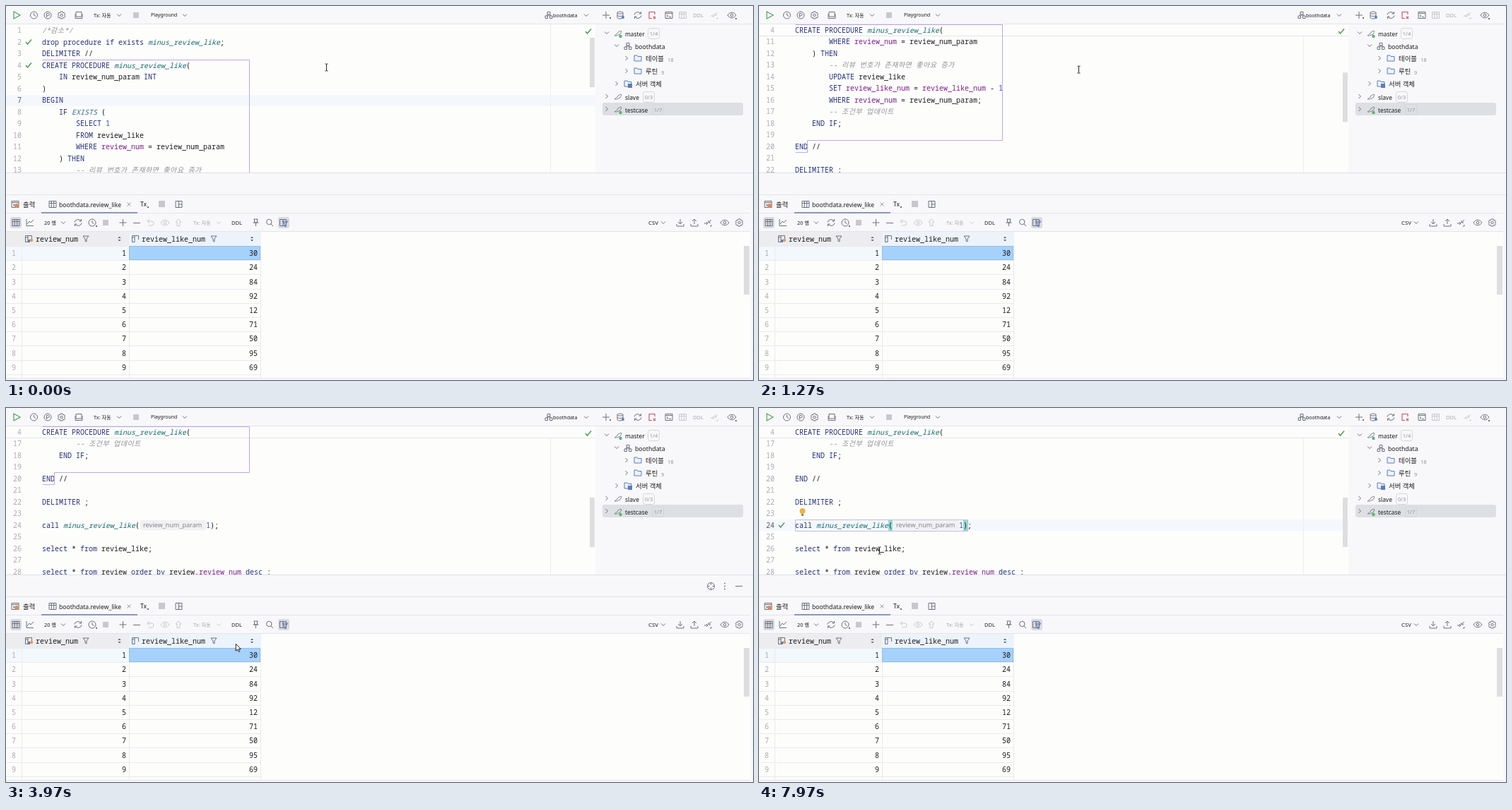
Recreate the animation shown at these times as an HTML page with a canvas. Size 1057 by 530 pixels, loop 8000 ms.

```html
<!DOCTYPE html>
<html lang="ko">
<head>
<meta charset="utf-8">
<style>
html, body { margin: 0; width: 100%; height: 100%; overflow: hidden; background: #fff; }
canvas { display: block; }
</style>
</head>
<body>
<canvas id="stage" width="1057" height="530"></canvas>
<script>
const g = document.getElementById('stage').getContext('2d');
const MONO = '"Noto Sans Mono", "Noto Sans CJK KR", monospace';
const UI = '"Noto Sans", "Noto Sans CJK KR", sans-serif';
const PAPER = '#fdfdfc', PANEL = '#f8f8fa', LINE = '#e4e5ea', INK = '#1c1c20', ICON = '#6c707e', FAINT = '#c6c8ce', MUTED = '#92949c', BLUE = '#5b7cc0', GREEN = '#4fa25c', FRAME = '#bfa6ee';
const LOOP = 8000, CHAR = 6, LEFT = 51, ROW = 16.5, CLICK = 4600, DONE = 7200;

const code = `/*감소*/
drop procedure if exists minus_review_like;
DELIMITER //
CREATE PROCEDURE minus_review_like(
    IN review_num_param INT
)
BEGIN
    IF EXISTS (
        SELECT 1
        FROM review_like
        WHERE review_num = review_num_param
    ) THEN
        -- 리뷰 번호가 존재하면 좋아요 증가
        UPDATE review_like
        SET review_like_num = review_like_num - 1
        WHERE review_num = review_num_param;
        -- 조건부 업데이트
    END IF;

END //

DELIMITER ;

call minus_review_like(1);

select * from review_like;

select * from review order by review.review_num desc ;`.split('\n');
const likes = [30, 24, 84, 92, 12, 71, 50, 95, 69];
const keyword = /^(drop|procedure|if|exists|delimiter|create|in|int|begin|select|from|where|then|update|set|end|call|order|by|desc)$/i;

// Icon outlines around their own centre
const circle = r => `M${r} 0A${r} ${r} 0 1 1 ${-r} 0A${r} ${r} 0 1 1 ${r} 0`;
const icons = {
  play: 'M-4-5L5 0L-4 5Z',
  clock: circle(5) + 'M0-3V0L2.5 1.5',
  letter: circle(5) + 'M-1.5 3V-2.5H.5A1.5 1.5 0 0 1 .5 .8H-1.5',
  gear: 'M-1.5-5H1.5L2-3.5L4-3.5L5-1L4 0L5 1.5L4 3.8L2 3.5L1.5 5H-1.5L-2 3.5L-4 3.8L-5 1.5L-4 0L-5-1L-4-3.5L-2-3.5Z' + circle(1.7),
  screen: 'M-4-4.5H4V2H-4ZM-5-2V4.5H5V-2',
  down: 'M-3-1.5L0 1.5L3-1.5',
  right: 'M-1.5-3L1.5 0L-1.5 3',
  schema: 'M-2-4.5H2V-1H-2ZM-5 1H-1.5V4.5H-5ZM1.5 1H5V4.5H1.5ZM0-1V0M-3 1V0H3V1',
  plus: 'M-5 0H5M0-5V5',
  minus: 'M-5 0H5',
  base: 'M-4-3.5C-4-5.5 4-5.5 4-3.5V3.5C4 5.5-4 5.5-4 3.5ZM-4-3.5C-4-1.5 4-1.5 4-3.5M-4 0C-4 2 4 2 4 0',
  refresh: 'M-5-.5A5 4.6 0 0 1 4-2.5M5 .5A5 4.6 0 0 1-4 2.5M4.5-5V-2H1.5M-4.5 5V2H-1.5',
  cut: 'M4-1V-4.5H-4V4.5H0M2 2L5 5M5 2L2 5',
  console: 'M-5-4.5H5V4.5H-5ZM-5-2.5H5M-3-.5L-1 1L-3 2.5M0 2.5H3',
  table: 'M-5-4.5H5V4.5H-5ZM-5-1.5H5M-1.7-4.5V4.5M1.7-4.5V4.5',
  arrows: 'M5-4L1 0M1-3V0H4M-5 1H0M-2-1L0 1L-2 3M3 5H5V3',
  eye: 'M-6 0C-3-5 3-5 6 0C3 5-3 5-6 0Z' + circle(1.8),
  link: 'M-5 3L-1 0L0-2L4-4L5-3L3 1L-2 3Z',
  folder: 'M-5-4H-1L0-2.5H5V4H-5Z',
  close: 'M-2.5-2.5L2.5 2.5M2.5-2.5L-2.5 2.5',
  layout: 'M-4.5-4.5H4.5V4.5H-4.5ZM0-4.5V4.5M0 0H4.5',
  chart: 'M-5-5V4.5H5M-4 2L-1-2L1 0L5-4',
  undo: 'M-2-5L-5-2L-2 1M-5-2H1A3 3 0 0 1 1 4H-3',
  up: 'M0-5L4-1H2V4.5H-2V-1H-4Z',
  pin: 'M-3-5H3M-2-5V0H2V-5M-4 0H4M0 0V5',
  search: 'M3-1A3.7 3.7 0 1 1-4.4-1A3.7 3.7 0 1 1 3-1M2 2L5 5',
  load: 'M0-5V2M-3-1L0 2L3-1M-5 2V5H5V2',
  send: 'M0 2V-5M-3-2L0-5L3-2M-5 2V5H5V2',
  funnel: 'M-4-4H4L1 0V4L-1 3V0Z',
  sort: 'M-1.5-1.5L0-3L1.5-1.5ZM-1.5 1.5L0 3L1.5 1.5Z',
  column: 'M-4.5-4.5H4.5V1M-4.5-4.5V4.5H-1V-4.5M-4.5-2H-1',
  target: circle(5) + 'M0-5V-2M0 5V2M-5 0H-2M5 0H2',
  tick: 'M-4 0L-1.5 3L4-3.5',
  beam: 'M-2-5H-.5L0-4.5L.5-5H2M0-4.5V4.5M-2 5H-.5L0 4.5L.5 5H2',
  arrow: 'M0 0V10L2.4 7.8L4 11.3L5.6 10.5L4 7.2H7Z'
};
for (const k in icons) icons[k] = new Path2D(icons[k]);

function icon(name, x, y, color = ICON, width = 1, fill) {
  g.save();
  g.translate(x, y);
  if (fill) { g.fillStyle = fill; g.fill(icons[name]); }
  g.strokeStyle = color;
  g.lineWidth = width;
  g.stroke(icons[name]);
  g.restore();
}
function rect(x, y, w, h, color) {
  g.fillStyle = color;
  g.fillRect(x, y, w, h);
}
function pill(x, y, w, h, fill, stroke) {
  g.beginPath();
  g.roundRect(x, y, w, h, 3);
  if (fill) { g.fillStyle = fill; g.fill(); }
  if (stroke) { g.strokeStyle = stroke; g.lineWidth = 1; g.stroke(); }
}
function dot(x, y, r, color) {
  g.beginPath();
  g.arc(x, y, r, 0, 7);
  g.fillStyle = color;
  g.fill();
}
function text(s, x, y, size = 8.4, color = INK, font = UI, align = 'left') {
  g.font = `${font === MONO ? 500 : 400} ${size}px ${font}`;
  g.fillStyle = color;
  g.textAlign = align;
  g.fillText(s, x, Math.round(y + size * .36));
}
const mono = (s, x, y, color = INK, align) => text(s, x, y, 10, color, MONO, align);

function path(points, color) {
  g.beginPath();
  points.forEach(([x, y]) => g.lineTo(Math.round(x) + .5, Math.round(y) + .5));
  g.strokeStyle = color;
  g.lineWidth = 1;
  g.stroke();
}

function tokenStyle(s) {
  if (/^(--|\/\*)/.test(s)) return ['#8f9096', true];
  if (s === 'EXISTS') return ['#326a8c', true];
  if (s === 'minus_review_like') return ['#146a70', true];
  if (/^review(_like)?_num$/.test(s)) return ['#7d1c88'];
  if (/^\d+$/.test(s)) return ['#2d50c0'];
  return [keyword.test(s) ? '#23307c' : INK];
}
function codeLine(n, y) {
  let x = LEFT;
  g.textAlign = 'left';
  for (const s of code[n - 1].match(/--.*|\/\*.*|\w+|\W/g) || []) {
    const [color, italic] = tokenStyle(s);
    g.font = `${italic ? 'italic ' : ''}500 10px ${MONO}`;
    g.fillStyle = color;
    for (const c of s) {
      g.fillText(c, x, Math.round(y + 3.6));
      x += c > '~' ? 9.7 : CHAR;
    }
    if (n === 24 && s === '(') {
      pill(x + 1, y - 7, 93, 14, '#f1f1f3');
      text('review_num_param', x + 5, y, 9.1, '#85868c');
      x += 94;
    }
  }
}

const smooth = p => (p = Math.min(1, Math.max(0, p)), p * p * (3 - 2 * p));

// Five wheel notches of three lines each
function scrollAt(t) {
  let s = 0;
  for (let k = 0; k < 5; k++) s += 49.6 * smooth((t - 531) / 242.6 - k);
  return Math.round(s);
}
const route = [[0, 453, 87], [600, 453, 87], [900, 452, 90], [2450, 452, 91], [2830, 47, 357], [3000, 47, 357], [3400, 330, 354], [3850, 330, 354], [4450, 285, 167], [4700, 285, 167], [5000, 401, 142], [6350, 401, 142], [6850, 15, 13], [7250, 15, 13], [7850, 170, 202], [8000, 170, 202]];
function mouseAt(t) {
  const i = Math.max(1, route.findIndex(k => k[0] > t));
  const [t0, x0, y0] = route[i - 1], [t1, x1, y1] = route[i];
  const p = smooth((t - t0) / (t1 - t0));
  return [x0 + (x1 - x0) * p, y0 + (y1 - y0) * p];
}

function editor(t) {
  const scroll = scrollAt(t), clicked = t >= CLICK, current = clicked ? 24 : 7;
  const lineY = n => 34.5 + ROW * (n - 1) - scroll;
  const number = (n, y) => mono(n, 22, y, n === current ? '#55565e' : '#a9abb3', 'right');
  g.save();
  g.beginPath();
  g.rect(0, 26, 834, 210);
  g.clip();
  rect(0, 26, 834, 210, PAPER);
  rect(0, Math.round(lineY(current) - 8), 834, 16, '#f4f8fd');
  rect(770, 26, 1, 210, '#eeeef2');
  if (clicked) for (const x of [183, 289]) rect(x, lineY(24) - 8, 6, 16, '#93d9d2');
  code.forEach((_, i) => {
    const n = i + 1, y = lineY(n);
    if (y < 15 || y > 246) return;
    number(n, y);
    codeLine(n, y);
    if (n === 2 || n === 4 || n === 24 && t >= DONE) icon('tick', 32, y, GREEN, 1.6);
  });
  if (scroll > 49.5) {
    rect(0, 26, 834, 16, PAPER);
    rect(0, 42, 834, 1, LINE);
    number(4, 34.5);
    codeLine(4, 34.5);
  }
  if (clicked) {
    const top = lineY(24) - 8.5, end = lineY(24) + 7.5;
    path([[51, top], [295, top], [295, end], [51, end], [51, top]], '#c9bbdc');
    if (t % 1000 < 500) rect(283, lineY(24) - 7, 1.5, 14, '#000');
    if (t >= DONE) {
      dot(61.5, 146, 4, '#efb13c');
      rect(60, 150, 3, 3, '#8d8a80');
    }
  } else {
    const top = Math.max(26, lineY(4) - 8.5), mid = lineY(19) + 7.5, end = lineY(20) + 7.5;
    path([[51, top], [344, top], [344, mid], [68, mid], [68, end], [51, end]], FRAME);
  }
  rect(826, 45 + scroll * .331, 7, 70, '#dedee1');
  icon('tick', 824, 36, GREEN, 1.6);
  g.restore();
}

function topBar() {
  rect(0, 25, 1057, 1, LINE);
  icon('play', 15, 13, GREEN, 1.2);
  icon('clock', 39.5, 13);
  icon('letter', 59, 13);
  icon('gear', 78.5, 13);
  icon('screen', 103, 13);
  text('Tx: 자동', 124, 13, 7.2);
  icon('down', 160, 13);
  rect(180, 9, 8, 8, FAINT);
  text('Playground', 205, 13, 6.9);
  icon('down', 253, 13);
  icon('schema', 768, 13);
  text('boothdata', 774, 13, 7);
  icon('down', 821, 13);
  icon('plus', 849, 13);
  rect(854, 16, 2, 2, ICON);
  icon('base', 869, 13);
  dot(873, 16, 2, BLUE);
  icon('refresh', 894, 13);
  icon('cut', 914, 13, '#c94f64', 1.1);
  icon('console', 938, 13);
  icon('table', 957.5, 13, FAINT);
  text('DDL', 972, 13, 7.5, '#a4a6ae');
  icon('arrows', 1002, 13, FAINT);
  icon('eye', 1027, 13);
  rect(1032, 17, 2, 2, ICON);
}

function badge(s, x, y) {
  pill(x + .5, y - 7.5, 16, 15, null, '#d5d6dc');
  text(s, x + 8.5, y + .5, 7.5, MUTED, UI, 'center');
}
function source(name, y, chevron, live, count, x) {
  icon(chevron, 850, y - 1);
  icon('link', 866, y, ICON, .8);
  if (live) dot(869.5, y + 4, 2.2, '#55b865');
  text(name, 876, y + .5);
  badge(count, x, y);
}
function tree() {
  pill(844, 137, 199, 18, '#dedfe3');
  source('master', 39, 'down', true, '1/4', 908);
  icon('down', 864, 56);
  icon('schema', 880, 57);
  text('boothdata', 890, 57.5, 8.7);
  [['테이블', 75, '18', 936], ['루틴', 93, '9', 927]].forEach(([s, y, n, x]) => {
    icon('right', 878, y - 1);
    icon('folder', 894, y - 1, BLUE, 1, '#edf2fb');
    text(s, 905, y, 9.4);
    text(n, x, y + 1, 7.6, MUTED);
  });
  icon('right', 864, 110);
  icon('folder', 880, 110, BLUE, 1, '#edf2fb');
  rect(880, 110, 6, 6, BLUE);
  text('서버 객체', 891, 111, 9.4);
  source('slave', 129, 'right', false, '0/3', 901);
  source('testcase', 147, 'right', true, '1/7', 914);
}

function resultBars(hover) {
  rect(0, 236, 1057, 1, '#dfe0e6');
  rect(0, 267, 1057, 1, LINE);
  if (hover) {
    icon('target', 997.5, 252.5);
    for (const y of [248.5, 252.5, 256.5]) dot(1017, y, .9, ICON);
    icon('minus', 1037, 252.5);
  }
  icon('console', 13, 281);
  dot(15, 283, 3, '#e08a55');
  text('출력', 24, 281.5, 9.4);
  icon('table', 66, 281);
  text('boothdata.review_like', 75, 282, 8.6);
  icon('close', 174, 281, '#9a9ca4');
  text('Tx', 190, 281, 8.6);
  rect(200, 284, 2, 2, ICON);
  rect(216, 276, 9, 9, FAINT);
  icon('layout', 244.5, 281);
  rect(0, 293, 1053, 1, LINE);
  rect(50, 292, 136, 2, '#8598c4');

  pill(6, 299, 16, 16, '#dadbe1');
  icon('table', 14, 307);
  icon('chart', 34, 307);
  text('20 행', 54, 307, 7.3);
  icon('down', 81, 307);
  icon('refresh', 102, 307);
  icon('clock', 122, 307);
  rect(127, 311, 2, 2, ICON);
  rect(137, 303, 8, 8, FAINT);
  icon('plus', 165.5, 307);
  icon('minus', 185, 307.5);
  icon('undo', 205, 307, FAINT);
  icon('eye', 225, 307, FAINT);
  icon('up', 244, 307, FAINT);
  text('Tx: 자동', 265, 307, 7.2, '#a4a6ae');
  icon('down', 301, 307, FAINT);
  text('DDL', 319, 307, 7.5);
  icon('pin', 353.5, 307);
  icon('search', 373, 307);
  pill(385, 299, 16, 16, '#dadbe1');
  icon('layout', 392, 307);
  icon('funnel', 395, 309, BLUE);
  text('CSV', 909, 307, 7.8);
  icon('down', 930, 307);
  icon('load', 954, 307);
  icon('send', 974, 307);
  icon('arrows', 993, 307);
  icon('eye', 1017, 307);
  icon('gear', 1037.5, 307);
}

function grid() {
  const top = 340, h = 20.2;
  rect(0, 319, 1053, 208, PAPER);
  rect(0, 320, 174, 20, '#ededef');
  rect(174, 320, 187, 20, '#edf3fb');
  rect(0, 340, 174, 20, '#f3f8fd');
  for (let i = 0; i < 10; i++) rect(0, Math.round(top + i * h), 361, 1, '#e9eaee');
  for (const x of [22, 174, 360]) rect(x, 340, 1, 187, '#e9eaee');
  rect(0, 319, 1053, 1, LINE);
  rect(174, 340, 186, 20, '#8fbfec');
  rect(175, 341, 184, 18, '#a5d1fb');
  icon('column', 32, 330);
  dot(36, 332, 2.2, '#dfa05a');
  rect(31, 331, 3, 4, BLUE);
  mono('review_num', 42, 330);
  icon('funnel', 113, 330);
  icon('sort', 160.5, 330, ICON, 1, ICON);
  icon('column', 183, 330);
  mono('review_like_num', 192, 330);
  icon('funnel', 294, 330);
  icon('sort', 348, 330, ICON, 1, ICON);
  likes.forEach((value, i) => {
    const y = 350.5 + i * h;
    mono(i + 1, 14, y, '#a9abb3', 'right');
    mono(i + 1, 170, y, INK, 'right');
    mono(value, 356, y, INK, 'right');
  });
  rect(1044, 340, 8, 69, '#dedee1');
  rect(0, 527, 1053, 1, LINE);
}

function pointer(x, y) {
  if (x > 45 && x < 834 && y > 26 && y < 236) icon('beam', Math.round(x) + .5, y, '#222');
  else icon('arrow', x, y, '#222', 1, '#fff');
}

function draw(now) {
  const t = now % LOOP, [x, y] = mouseAt(t);
  rect(0, 0, 1057, 530, PANEL);
  topBar();
  editor(t);
  tree();
  resultBars(y > 236);
  grid();
  pointer(x, y);
  requestAnimationFrame(draw);
}
requestAnimationFrame(draw);
</script>
</body>
</html>
```
